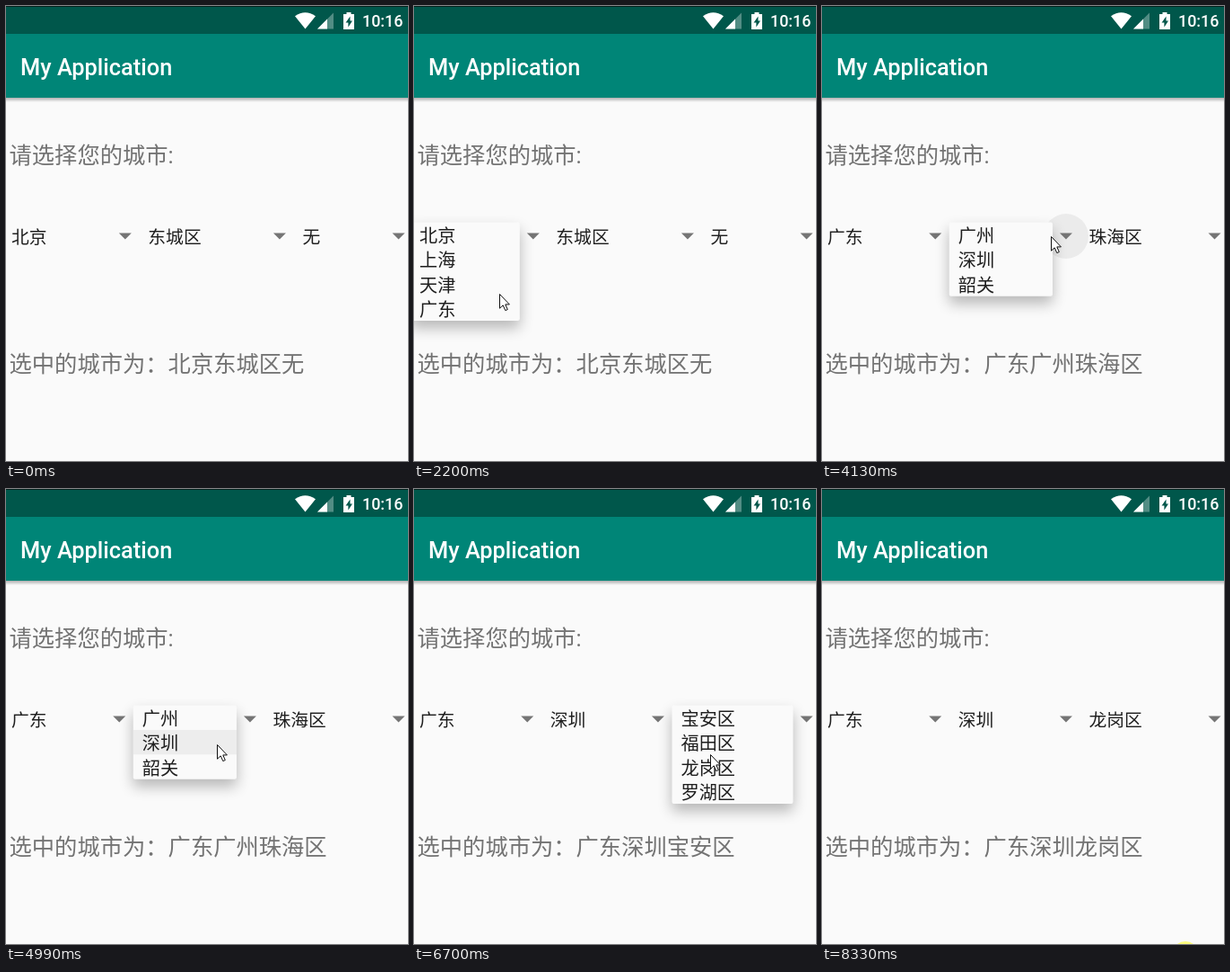
Recreate the animation shown at these times as an HTML page. Size 448 by 506 pixels, loop 8420 ms.

```html
<!DOCTYPE html>
<html lang="zh-CN">
<head>
<meta charset="utf-8">
<title>My Application</title>
<style>
html, body { margin: 0; width: 100%; height: 100%; overflow: hidden; background: #fafafa; }
svg { display: block; }
text { font-family: Roboto, "Noto Sans CJK SC", "Noto Sans CJK", sans-serif; white-space: pre; }
.big { font-size: 25.3px; fill: #737373; }
.item { font-size: 19.8px; fill: #1f1f1f; }
.row { font-size: 20.2px; fill: #1f1f1f; }
.shadow { filter: blur(8px); }
</style>
</head>
<body>
<svg width="448" height="506" viewBox="0 0 448 506">
  <defs>
    <linearGradient id="drop" x2="0" y2="1">
      <stop stop-opacity=".3"/>
      <stop offset="1" stop-opacity="0"/>
    </linearGradient>
  </defs>
  <rect width="448" height="506" fill="#fafafa"/>
  <rect y="102" width="448" height="5" fill="url(#drop)"/>
  <rect y="31" width="448" height="71" fill="#008577"/>
  <rect width="448" height="31" fill="#00574b"/>
  <rect width="448" height="1" fill="#06211d"/>
  <g fill="#fff">
    <path d="M333.5 25.5L322 11.3Q333.5 3 345 11.3Z"/>
    <path d="M365 7.5V25.5H347Z" opacity=".32"/>
    <path d="M358 14.5V25.5H347Z"/>
    <path d="M379.5 7H384.5V9H388V26H376V9H379.5Z"/>
    <path d="M383.5 11.5L378.6 18.6H381.4V23.5L386 16.4H383.5Z" fill="#00574b"/>
    <text x="397" y="23" font-size="17.9" font-weight="500">10:16</text>
    <text x="16" y="77" font-size="25.4" font-weight="500">My Application</text>
  </g>
  <text class="big" x="3.5" y="175">请选择您的城市:</text>
  <text class="big" x="3.5" y="407" id="result"></text>
  <g id="spinners"></g>
  <g id="popups"></g>
  <circle id="click" r="15" fill="#ff0" opacity=".5"/>
  <path id="cursor" d="M-.5-.5v15.7l3.7-3.4 2.6 5.8 2.5-1.1-2.5-5.6h4.6Z" fill="#fff" stroke="#111"/>
</svg>
<script>
const LOOP = 8420, HOLD = 145, FADE = 260;
const TOP = 240.5, PITCH = 27.4, CHAR = 19.8, TOTAL = 457;
const $ = id => document.getElementById(id);

// Each pick opens one spinner's list, then closes it and sets new names
const first = ['北京', '东城区', '无'];
const picks = [
  { rows: ['北京', '上海', '天津', '广东'], open: 1510, close: 2830, names: ['广东', '广州', '珠海区'] },
  { rows: ['广州', '深圳', '韶关'], open: 3890, close: 5170, names: ['广东', '深圳', '宝安区'] },
  { rows: ['宝安区', '福田区', '龙岗区', '罗湖区'], open: 5990, close: 7300, names: ['广东', '深圳', '龙岗区'] }
];

// Mouse trips: leave, arrive, x, y, press
const enter = { x: 234, y: 446 };
const trips = [
  [220, 770, 133, 256, 830],
  [1920, 2290, 90, 332, 2290],
  [2440, 3210, 256, 257, 3360],
  [4200, 4700, 230, 287, 4750],
  [4900, 5480, 322, 258, 5600],
  [6200, 6930, 334, 308, 6930],
  [7680, 8100, 368, 510],
  [8100, 8320, 405, 518, 8330]
].map(([leave, arrive, x, y, press]) => ({ leave, arrive, x, y, press }));

function set(el, attrs) {
  for (const k in attrs) el.setAttribute(k, attrs[k]);
}
function add(parent, tag, attrs, text) {
  const el = document.createElementNS('http://www.w3.org/2000/svg', tag);
  set(el, attrs);
  if (text) el.textContent = text;
  return parent.appendChild(el);
}
const show = (el, on) => { el.style.display = on ? '' : 'none'; };
const ramp = (t, a, b) => Math.min(1, Math.max(0, (t - a) / (b - a)));
const smooth = u => u * u * (3 - 2 * u);
const mix = (a, b, f) => Math.round(a + (b - a) * f);

// Spinners share the spare width equally beside their text
function layout(names) {
  const spare = (TOTAL - CHAR * names.join('').length) / 3;
  let x = 6;
  return names.map(name => {
    const label = x;
    x += spare + CHAR * name.length;
    return { name, label, arrow: x - 25.5 };
  });
}

const spinners = first.map(() => ({
  ripple: add($('spinners'), 'circle', { cy: 256 }),
  label: add($('spinners'), 'text', { class: 'item', y: 263.5 }),
  arrow: add($('spinners'), 'path', { d: 'M-7 252.6H7L0 259.4Z', fill: '#757575' })
}));

picks.forEach((p, i) => {
  const slot = layout(i ? picks[i - 1].names : first)[i];
  const x = slot.label - 10;
  const box = { x, y: TOP, width: slot.arrow - 15 - x, rx: 2 };
  const picked = p.rows.indexOf(p.names[i]);
  p.g = add($('popups'), 'g', {});
  p.shadow = add(p.g, 'rect', { ...box, y: TOP + 8, class: 'shadow' });
  p.back = add(p.g, 'rect', { ...box, fill: '#fafafa' });
  p.clip = add(add(p.g, 'clipPath', { id: 'clip' + i }), 'rect', box);
  p.list = add(p.g, 'g', { 'clip-path': `url(#clip${i})` });
  p.mark = add(p.list, 'rect', { ...box, rx: 0, y: TOP + picked * PITCH, height: PITCH, opacity: .05 });
  p.rows.forEach((name, k) =>
    add(p.list, 'text', { class: 'row', x: x + 10, y: 262.7 + k * PITCH }, name));
});

function drawPopup(p, t) {
  const on = t >= p.open && t < p.close + FADE;
  show(p.g, on);
  if (!on) return;
  const grow = 1 - (1 - ramp(t, p.open, p.open + 230)) ** 3;
  const height = 30 + (p.rows.length * PITCH - 30) * grow;
  const alpha = ramp(t, p.open - 40, p.open + 100) * (1 - ramp(t, p.close, p.close + FADE));
  for (const el of [p.shadow, p.back, p.clip]) set(el, { height });
  set(p.shadow, { opacity: .27 * alpha ** 2 });
  set(p.back, { opacity: alpha ** 2 });
  set(p.list, { opacity: alpha });
  show(p.mark, t > p.close - 250);
}

function drawSpinner(s, slot, open, t) {
  s.label.textContent = slot.name;
  set(s.label, { x: slot.label });
  set(s.arrow, { transform: `translate(${slot.arrow})` });
  set(s.ripple, {
    cx: slot.arrow,
    r: 25 * ramp(t, open - 140, open + 60),
    opacity: .06 * (1 - ramp(t, open + 250, open + 500))
  });
}

function drawMouse(t) {
  const i = trips.findLastIndex(m => t >= m.leave);
  show($('cursor'), i >= 0);
  if (i >= 0) {
    const to = trips[i], from = trips[i - 1] || enter;
    const f = smooth(ramp(t, to.leave, to.arrive));
    set($('cursor'), { transform: `translate(${mix(from.x, to.x, f)} ${mix(from.y, to.y, f)})` });
  }
  const hit = trips.find(m => t >= m.press && t < m.press + HOLD);
  show($('click'), hit);
  if (hit) set($('click'), { cx: hit.x, cy: hit.y });
}

function draw(t) {
  const last = picks.findLast(p => t >= p.close);
  const names = last ? last.names : first;
  const slots = layout(names);
  $('result').textContent = '选中的城市为：' + names.join('');
  spinners.forEach((s, i) => drawSpinner(s, slots[i], picks[i].open, t));
  picks.forEach(p => drawPopup(p, t));
  drawMouse(t);
}

const start = performance.now();
function tick() {
  draw((performance.now() - start) % LOOP);
  requestAnimationFrame(tick);
}
tick();
</script>
</body>
</html>
```
